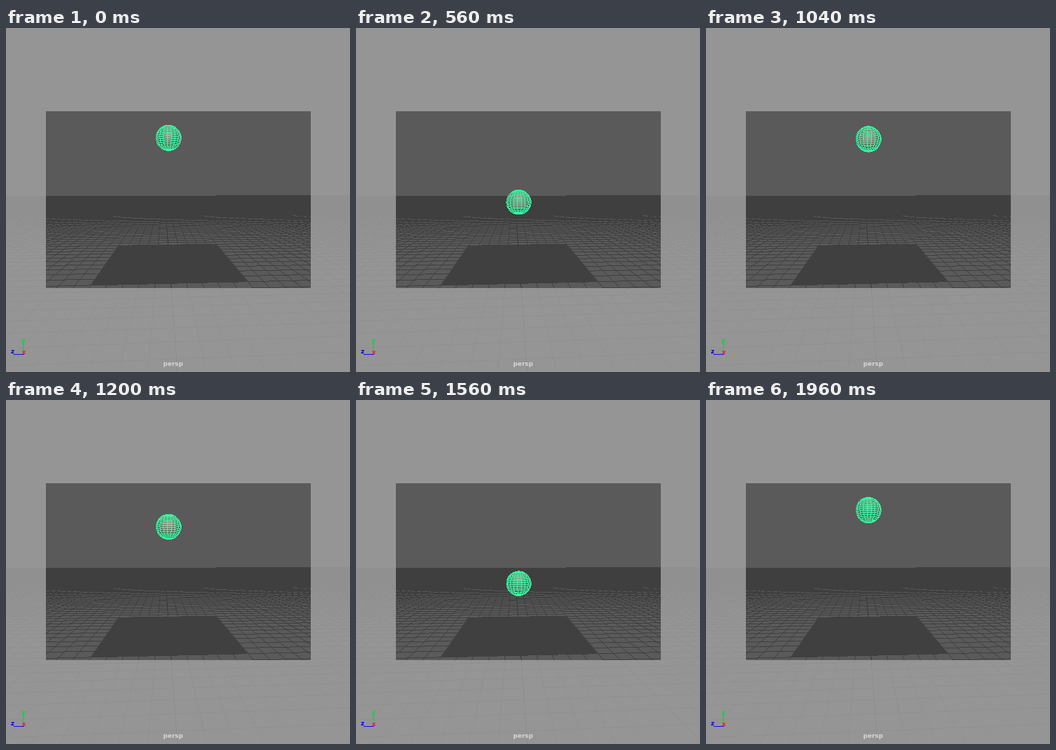
An HTML page with a canvas that plays this animation: 500 px wide and 500 px high, repeating every 2000 ms.

```html
<!DOCTYPE html>
<html>
<head>
<meta charset="utf-8">
<style>
html, body { margin: 0; width: 100%; height: 100%; overflow: hidden; background: #949494; }
canvas { display: block; }
</style>
</head>
<body>
<canvas id="stage" width="500" height="500"></canvas>
<script>
const SIZE = 500, FOCAL = 374, PITCH = 0.0717, YAW = 0.0575;
const CAM_X = 0.76, CAM_H = 6.47, CAM_Z = 20.95;
const NEAR = -13, FAR = 94, SIDE = 100;
const GATE = [58, 121, 385, 257];
const GREEN = '#35ffa0';
const ctx = document.getElementById('stage').getContext('2d');
const { sin, cos, abs, PI } = Math;

// Point relative to the camera (right, up, forward) to pixels
function toPixel(x, y, z) {
  const depth = z * cos(PITCH) - y * sin(PITCH);
  const up = y * cos(PITCH) + z * sin(PITCH);
  return [250 + FOCAL * x / depth, 249.5 - FOCAL * up / depth, depth];
}

function floorPoint(v, u) {
  return toPixel(-CAM_X + v * cos(YAW) - u * sin(YAW), -CAM_H,
                 CAM_Z + v * sin(YAW) + u * cos(YAW));
}

// Hard-edged one pixel line, clipped to the stage
function pixelLine(g, a, b) {
  const k = abs(b[0] - a[0]) > abs(b[1] - a[1]) ? 0 : 1;
  if (a[k] > b[k]) [a, b] = [b, a];
  const slope = (b[1 - k] - a[1 - k]) / (b[k] - a[k]);
  const end = Math.min(SIZE, b[k]);
  for (let i = Math.max(0, Math.ceil(a[k])); i < end; i++) {
    const j = Math.round(a[1 - k] + (i - a[k]) * slope);
    if (k) g.fillRect(j, i, 1, 1); else g.fillRect(i, j, 1, 1);
  }
}

function label(g, text, x, y, color) {
  g.font = 'bold 9px "DejaVu Sans", sans-serif';
  g.textAlign = 'center';
  g.fillStyle = color;
  g.fillText(text, x, y);
}

function makeScene() {
  const canvas = document.createElement('canvas');
  canvas.width = canvas.height = SIZE;
  const g = canvas.getContext('2d');
  g.fillStyle = '#5a5a5a';
  g.fillRect(0, 0, SIZE, SIZE);

  // The centre line goes first, so the dense far rows cover it
  g.fillStyle = '#343434';
  pixelLine(g, floorPoint(0, NEAR), floorPoint(0, FAR));
  g.fillStyle = '#3f3f3f';
  for (let u = NEAR; u <= FAR; u++) pixelLine(g, floorPoint(-SIDE, u), floorPoint(SIDE, u));
  for (let v = -SIDE; v <= SIDE; v++) {
    if (v) pixelLine(g, floorPoint(v, NEAR), floorPoint(v, FAR));
  }

  g.fillStyle = '#404040';
  g.beginPath();
  for (const [v, u] of [[-5, 5], [5, 5], [5, -5], [-5, -5]]) {
    const [x, y] = floorPoint(v, u);
    g.lineTo(x, y + 0.5);
  }
  g.fill();

  // Pale mask around the gate
  g.fillStyle = 'rgba(164,164,164,.8)';
  g.beginPath();
  g.rect(0, 0, SIZE, SIZE);
  g.rect(...GATE);
  g.fill('evenodd');

  g.fillStyle = '#1fc34a';
  g.fillRect(25, 459, 1, 15);
  g.fillStyle = '#1010e0';
  g.fillRect(11, 474, 15, 1);
  label(g, 'y', 25.5, 457, '#00d83c');
  label(g, 'z', 9.5, 473, '#0000e0');
  label(g, 'x', 26, 474, '#f02020');
  label(g, 'persp', 243, 491, '#d6d6d6');
  return canvas;
}

function ballHeight(t) {
  const [hit, span, power] = t < 960 ? [480, 480, 3] : [1480, 520, 2.45];
  const x = 1 - abs(t - hit) / span;
  return 1 + 8.92 * (1 - Math.pow(x, power));
}

function drawBall(h) {
  const c = [-CAM_X, h - CAM_H, CAM_Z];
  const [px, py, depth] = toPixel(...c);
  const r = FOCAL / depth;
  const shade = ctx.createRadialGradient(px, py - r * 0.3, 0, px, py - r * 0.3, r * 1.1);
  shade.addColorStop(0, '#b09a9a');
  shade.addColorStop(1, '#4c4c4c');
  ctx.fillStyle = shade;
  ctx.beginPath();
  ctx.arc(px, py, r - 0.5, 0, 2 * PI);
  ctx.fill();

  const normal = (i, j) => {
    const lat = (i / 20 - 0.5) * PI, lon = j / 10 * PI + YAW;
    return [cos(lat) * sin(lon), sin(lat), cos(lat) * cos(lon)];
  };
  const vertex = (i, j) => {
    const [x, y] = toPixel(...normal(i, j).map((q, k) => q + c[k]));
    return [x - 0.5, y - 0.5];
  };
  const edge = (i, j, i2, j2) => {
    const n = normal((i + i2) / 2, (j + j2) / 2);
    const facing = n.reduce((sum, q, k) => sum - q * (c[k] + q), 0);
    if (facing > -2) pixelLine(ctx, vertex(i, j), vertex(i2, j2));
  };
  ctx.fillStyle = GREEN;
  for (let i = 0; i < 20; i++) {
    for (let j = 0; j < 20; j++) {
      edge(i, j, i + 1, j);
      if (i) edge(i, j, i, j + 1);
    }
  }
}

const scene = makeScene();

function frame() {
  const t = Math.floor(performance.now() % 2000 / 40) * 40;
  ctx.drawImage(scene, 0, 0);
  drawBall(ballHeight(t));
  requestAnimationFrame(frame);
}
frame();
</script>
</body>
</html>
```
